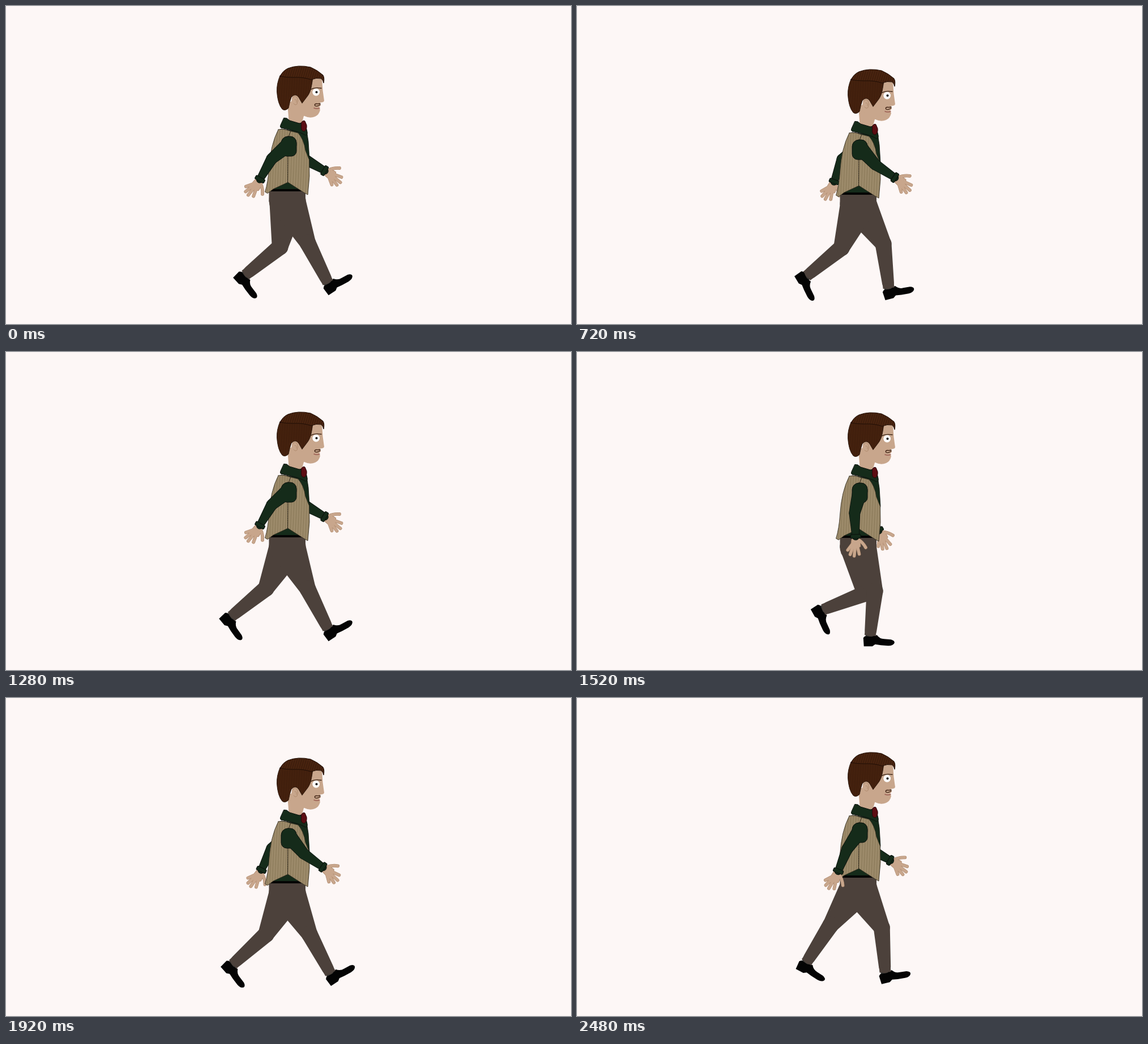
An HTML page with a canvas that plays this animation: 998 px wide and 561 px high, repeating every 2560 ms.

```html
<!DOCTYPE html>
<html lang="en">
<head>
<meta charset="utf-8">
<title>Walk cycle</title>
<style>
html, body { margin: 0; width: 100%; height: 100%; overflow: hidden; background: #fdf7f6; }
canvas { display: block; }
</style>
</head>
<body>
<canvas id="stage" width="998" height="561"></canvas>
<script>
const ctx = document.getElementById('stage').getContext('2d');
const STEP = 80, FRAMES = 32, CYCLE = 16;
const INK = '#0b100c', SKIN = '#c8a68c', SKIN_LINE = '#a98468', HAIR = '#48230f',
      GREEN = '#152b1a', VEST = '#9c8a6a', PANTS = '#4c413b', BLACK = '#040404';

// Each key: frame, then angles in degrees from straight down, positive forwards.
const BOB = [[0, 15], [2, 27], [4, 5], [6, -5], [8, 15], [10, 27], [12, 5], [14, -5], [16, 15]];
// Legs: thigh, shin, shoe tilt (toe down positive).
const LEG_A = [
  [0, -27, -51, 50], [2, -15, -54, 62], [4, 31, -84, 60], [6, 41, 10, -10], [8, 28, 28, -33],
  [10, 36, -14, 4], [12, 6, 11, -4], [14, 34, -18, 6], [16, 25.6, 27, -33]];
const LEG_B = [
  [0, 25.6, 27, -33], [2, 37, -14, 0], [4, 4, 2, 0], [6, -42, -30, 28], [8, -27, -48, 48],
  [10, -15, -54, 70], [12, 31, -84, 86], [13, -7, -50, 58], [14, -41, -37, 30],
  [15, -36, -33, 28], [16, -27, -51, 50]];
const LEG_START = [[0, -9, -51, 48], LEG_A[1]];
// Arms: upper, forearm.
const ARM_NEAR = [
  [0, -50, -30], [2, -28, -8], [4, 0, 13], [6, 20, 37], [8, 40, 55],
  [10, 44, 58], [12, 12, 36], [14, -20, -14], [16, -50, -30]];
const ARM_FAR = [
  [0, 42, 60], [2, 30, 45], [4, 2, 18], [6, -25, -6], [8, -50, -26],
  [10, -54, -14], [12, -24, 20], [14, 8, 62], [16, 42, 60]];

const SHAPES = {
  neck: 'M497 155L500 194Q510 199 522 193L527 176L520 150Z',
  face: 'M510 118L540 112L558 112L559.5 134L562 152Q562 155 554 155.5L556 160L553 164L555 168Q553 177 546 180Q537 184 527 179L515 177L503 160Z',
  hair: 'M484 108Q478 122 478.5 136Q480 158 488 167Q493 171 499 165Q501 154 504 146Q511 138 517 146L523 156.5L531 146Q538 138 540 124L542 112Z',
  cap: 'M484 109Q489 99 498 95Q516 88 538 93Q550 98 560 107Q563 112 561 121Q560 116 557 113Q548 111 539 115Q525 110 507 111Q494 111 484 109Z',
  ear: 'M506 148Q509 142 514 146Q517 152 514 158Q511 161 508 157',
  shirt: 'M486 202L515 206L531 204L534 224L536 256L526 298L524 311L468 311L478 290Z',
  vest: 'M481 203Q490 201 500 205L516 209Q526 220 529 240L535.5 256L536 285L533 318L526 314L498 296L472 308L462 315.5L457.5 313Q463 295 464.5 272Q467 230 481 203Z',
  collar: 'M491 182.5L496 183L501 187L518 192L528 190L532 207Q533 212 529 213Q519 207 500 203L488 200.5Q483 200 485 195Z',
  tie: 'M522 190Q525 186 528 188L531 195Q532 203 527 206Q521 206 521.5 198Z',
  shoe: 'M-12 3L-9 0L3 1L12 -2Q17 5 25 5L37 6Q44 8 43 12Q41 17 32 17L19 16L9 14.5L4 18L-11 18Z'
};
const paths = {};
for (const name in SHAPES) paths[name] = new Path2D(SHAPES[name]);

const rad = deg => deg * Math.PI / 180;
const reach = ([x, y], deg, len) => [x + Math.sin(rad(deg)) * len, y + Math.cos(rad(deg)) * len];

function pose(keys, frame) {
  let i = 1;
  while (i < keys.length - 1 && keys[i][0] < frame) i++;
  const a = keys[i - 1], b = keys[i];
  const u = (frame - a[0]) / (b[0] - a[0]);
  return a.slice(1).map((v, j) => v + (b[j + 1] - v) * u);
}

function fill(path, color, line, width = 0.8) {
  ctx.fillStyle = color;
  ctx.fill(path);
  if (line) {
    ctx.strokeStyle = line;
    ctx.lineWidth = width;
    ctx.stroke(path);
  }
}

function stroke(d, color, width) {
  ctx.strokeStyle = color;
  ctx.lineWidth = width;
  ctx.stroke(new Path2D(d));
}

function placed([x, y], angle, draw) {
  ctx.save();
  ctx.translate(x, y);
  ctx.rotate(rad(angle));
  draw();
  ctx.restore();
}

function taper(from, to, r1, r2, grow = 0) {
  const a = Math.atan2(to[1] - from[1], to[0] - from[0]);
  const p = new Path2D();
  p.arc(...from, r1 + grow, a + Math.PI / 2, a - Math.PI / 2);
  p.arc(...to, r2 + grow, a - Math.PI / 2, a + Math.PI / 2);
  p.closePath();
  return p;
}

function leg([thigh, shin, tilt]) {
  const hip = [497, 328];
  const knee = reach(hip, thigh, 83), ankle = reach(knee, shin, 80);
  fill(taper(knee, reach(ankle, shin, 1), 8, 8), '#343432');
  placed(ankle, tilt, () => fill(paths.shoe, BLACK));
  const cuff = reach(ankle, shin, -10);
  fill(taper(hip, knee, 32.5, 14.5), PANTS);
  fill(taper(knee, cuff, 14.5, 10.5), PANTS);
  placed(cuff, -shin, () => {
    ctx.fillStyle = PANTS;
    ctx.fillRect(-10, 0, 20, 9);
  });
}

function hand(wrist, angle) {
  placed(wrist, -angle, () => {
    const fingers = 'M4 5Q12 10 17 20M2 14L5 31M-1 14L-4 34M-4 13L-11 31M-5 11L-15 23';
    const palm = new Path2D('M-6 0L6 0Q9 9 8 18Q0 23 -9 18Q-9 8 -6 0Z');
    stroke(fingers, SKIN_LINE, 5.8);
    fill(palm, SKIN, SKIN_LINE);
    stroke(fingers, SKIN, 4.8);
  });
}

function arm(shoulder, [upper, fore], near) {
  const elbow = reach(shoulder, upper, 40), wrist = reach(elbow, fore, 42);
  hand(wrist, fore);
  const top = near ? 13 : 11;
  const parts = [[shoulder, elbow, top, 9.5], [elbow, wrist, 9.5, 6]];
  for (const p of parts) fill(taper(...p, 0.5), INK);
  if (near) {
    const cap = new Path2D();
    cap.roundRect(486, 215, 27, 35, [12, 11, 9, 10]);
    fill(cap, GREEN, INK, 1);
  }
  for (const p of parts) fill(taper(...p, -0.3), GREEN);
  placed(wrist, -fore, () => {
    const cuff = new Path2D();
    cuff.roundRect(-9, -4, 18, 7, 2);
    fill(cuff, GREEN, INK, 1);
  });
}

function hatch(path, color, gap, slant, x0, x1, y0, y1) {
  ctx.save();
  ctx.clip(path);
  ctx.beginPath();
  for (let x = x0; x < x1; x += gap) {
    ctx.moveTo(x + slant, y0);
    ctx.lineTo(x, y1);
  }
  ctx.strokeStyle = color;
  ctx.lineWidth = 0.7;
  ctx.stroke();
  ctx.restore();
}

function torso() {
  fill(paths.shirt, GREEN, INK);
  ctx.fillStyle = BLACK;
  ctx.fillRect(468, 308, 54, 4);
  fill(paths.vest, VEST);
  hatch(paths.vest, '#80704f', 4.5, 5, 452, 540, 200, 320);
  stroke(SHAPES.vest, '#2b261b', 0.8);
  ctx.setLineDash([3, 1]);
  stroke('M503 206Q498 215 498 228L497.5 296', '#282116', 1);
  ctx.setLineDash([]);
}

function dot(x, y, r, color) {
  ctx.fillStyle = color;
  ctx.beginPath();
  ctx.arc(x, y, r, 0, 7);
  ctx.fill();
}

function head() {
  fill(paths.neck, SKIN);
  fill(paths.face, SKIN);
  fill(paths.hair, HAIR, '#1e0d05');
  hatch(paths.hair, '#32170a', 3, -3, 476, 548, 106, 172);
  fill(paths.cap, HAIR, '#1e0d05', 1);
  hatch(paths.cap, '#32170a', 4, 10, 470, 566, 88, 122);
  fill(paths.ear, SKIN);
  stroke(SHAPES.ear + 'M510 150Q514 149 513 155', SKIN_LINE, 0.8);
  dot(547.7, 137, 6.4, '#fff');
  dot(548.5, 137, 2.1, '#111');
  stroke('M539 132Q545 128 557 130', '#3b2416', 1.4);
  stroke('M555 159Q549 163 546 161Q544 158 548 157.5Q552 158 555 157', '#3c2011', 1.4);
  stroke('M544 165Q549 167 554 165', '#9b5d52', 1.5);
  fill(paths.collar, GREEN, INK, 1);
  fill(paths.tie, '#5b0d13', '#25070a', 1);
}

function draw(frame) {
  const k = frame % CYCLE;
  ctx.fillStyle = '#fdf7f6';
  ctx.fillRect(0, 0, 998, 561);
  ctx.save();
  ctx.lineCap = ctx.lineJoin = 'round';
  ctx.translate(0, pose(BOB, k)[0]);
  arm([500, 225], pose(ARM_FAR, k), false);
  leg(pose(frame < 2 ? LEG_START : LEG_A, k));
  leg(pose(LEG_B, k));
  ctx.fillStyle = PANTS;
  ctx.fillRect(464.5, 310, 64.5, 20);
  torso();
  arm([500, 229], pose(ARM_NEAR, k), true);
  head();
  ctx.restore();
}

function tick() {
  draw(Math.floor(performance.now() / STEP) % FRAMES);
  requestAnimationFrame(tick);
}
tick();
</script>
</body>
</html>
```
